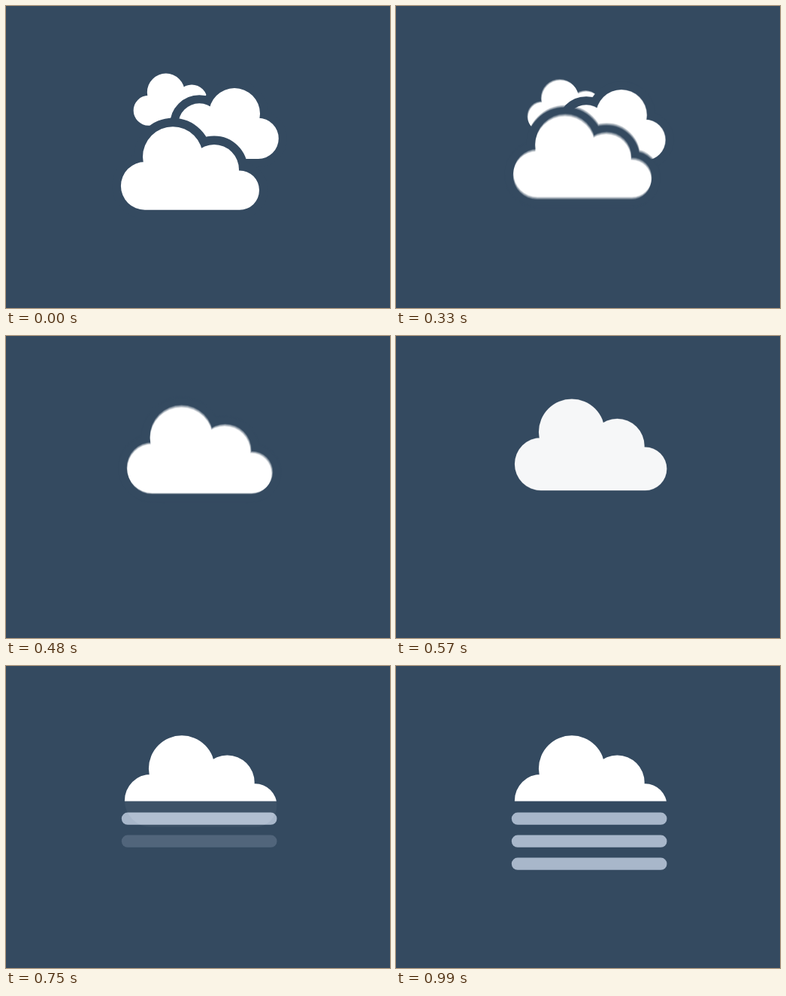
Write an HTML page with a canvas that moves like this. It is 511 px wide and 401 px high and loops after 1470 ms.

```html
<!DOCTYPE html>
<html lang="en">
<head>
<meta charset="utf-8">
<title>Clouds to fog</title>
<style>
  html, body { margin: 0; width: 100%; height: 100%; overflow: hidden; background: #344a60; }
  canvas { display: block; width: 511px; height: 401px; }
</style>
</head>
<body>
<canvas id="stage" width="511" height="401"></canvas>
<script>
const W = 511, H = 401, LOOP = 1470, STEP = 30;
const SKY = '#344a60', GAP = 11.6;
const BAR_GLOW = 'rgb(116, 109, 106)'; // added to the sky gives #a8b7ca
const SAMPLES = 8, SHUTTER = 15;

const out = document.getElementById('stage').getContext('2d');
const layer = document.createElement('canvas');
layer.width = W;
layer.height = H;
const g = layer.getContext('2d');

const ramp = (t, a, b) => Math.min(1, Math.max(0, (t - a) / (b - a)));
const ease = (t, a, b) => {
  const p = ramp(t, a, b);
  return p * p * (3 - 2 * p);
};
const mix = (a, b, p) => a + (b - a) * p;

// Cloud outline around its own centre, 184 x 110.5
const cloud = new Path2D();
for (const [x, y, r] of [[-23, -15.2, 40], [32, 1.6, 33], [-60.2, 23.4, 31.9], [65.8, 29.1, 26.2]]) {
  cloud.moveTo(x + r, y);
  cloud.arc(x, y, r, 0, Math.PI * 2);
}
cloud.rect(-60.2, 5, 126, 50.3);

function drawCloud(x, y, size, { flip = 1, gap = 0, alpha = 1 } = {}) {
  if (alpha <= 0) return;
  g.save();
  g.translate(x, y);
  g.scale(size * flip, size);
  if (gap) {
    g.strokeStyle = SKY;
    g.lineWidth = 2 * gap / size;
    g.lineJoin = 'round';
    g.stroke(cloud);
  }
  g.globalAlpha = alpha;
  g.fillStyle = '#fff';
  g.fill(cloud);
  g.restore();
}

function drawBar(y, alpha) {
  if (alpha <= 0) return;
  g.save();
  g.globalCompositeOperation = 'lighter';
  g.globalAlpha = alpha;
  g.fillStyle = BAR_GLOW;
  g.beginPath();
  g.roundRect(153.8, y, 206.7, 16.2, 8.1);
  g.fill();
  g.restore();
}

// pos drives movement, t drives opacity
function drawScene(pos, t) {
  g.fillStyle = SKY;
  g.fillRect(0, 0, W, H);

  const go = ease(pos, 240, 540);
  const x = mix(245, 259.2, go);
  const y = mix(215.5, 143.6, go) + 9.4 * ease(pos, 540, 720);
  const size = mix(1, 1.1, ease(pos, 420, 540));

  if (t < 540) {
    drawCloud(mix(227.2, 252.2, go), mix(124.1, 162.1, go), 0.625);
    drawCloud(mix(284.5, 265.5, go), mix(156, 165, go), 0.85, { flip: -1, gap: GAP - 0.5 });
    drawCloud(x, y, size, { gap: GAP });
  } else {
    g.save();
    g.beginPath();
    g.rect(0, 0, W, y + 26.4);
    g.clip();
    drawCloud(x, y, size, { alpha: ramp(t, 570, 630) });
    g.restore();
    drawCloud(x, y, size, { alpha: 1 - ease(t, 540, 780) });
  }

  drawBar(194.6, ramp(t, 600, 730));
  drawBar(224.6, ramp(t, 720, 840));
  drawBar(254.6, ramp(t, 870, 990));
}

// Averages several moments for motion blur
function render(t) {
  const moving = t > 240 && t < 720;
  const count = moving ? SAMPLES : 1;
  for (let i = 0; i < count; i++) {
    drawScene(t + SHUTTER * ((i + 0.5) / count - 0.5), t);
    out.globalAlpha = 1 / (i + 1);
    out.drawImage(layer, 0, 0);
  }
}

const start = performance.now();
let shown = -1;
function tick() {
  const t = Math.floor(((performance.now() - start) % LOOP) / STEP) * STEP;
  if (t !== shown) {
    render(t);
    shown = t;
  }
  requestAnimationFrame(tick);
}
tick();
</script>
</body>
</html>
```
